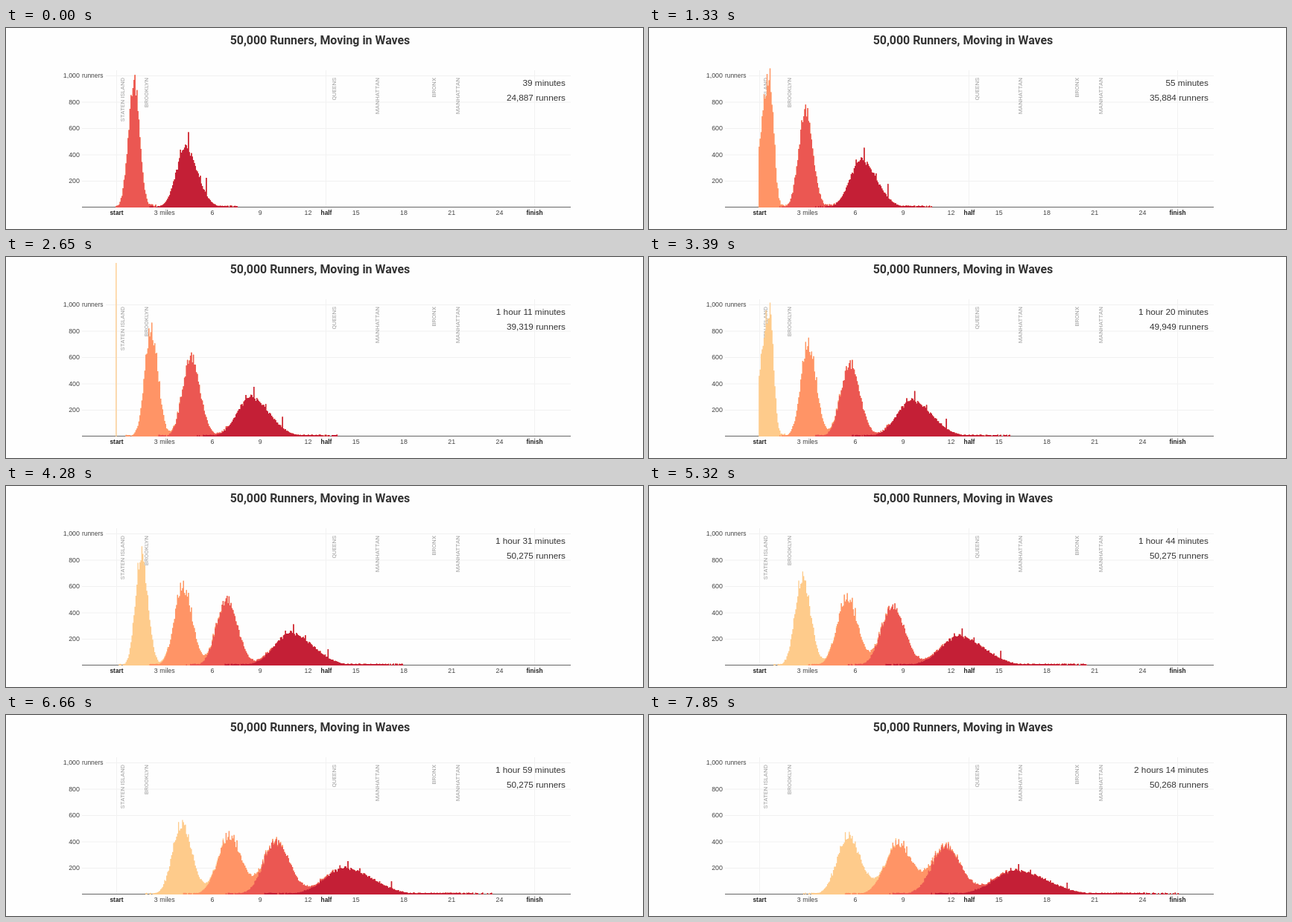
Recreate the animation shown at these times as an HTML page. Size 855x271 px, loop 7.99 s.

```html
<!DOCTYPE html>
<html lang="en">
<head>
<meta charset="utf-8">
<title>50,000 Runners, Moving in Waves</title>
<style>
  html, body { margin: 0; width: 100%; height: 100%; overflow: hidden; background: #fefefe; }
  svg { display: block; width: 855px; height: 271px; font-family: "Liberation Sans", Arial, sans-serif; }
</style>
</head>
<body>
<svg id="chart" viewBox="0 0 855 271"></svg>
<script>
const LOOP = 7990, STEP = 148, LAST = 53;
const START = 148.5, MILE = 561 / 26.2, BASE = 242, UNIT = 0.1775, TOP = 8;
const LEFT = 147.2, BIN = 561 / 421.95, BINS = 424;   // 100 m per bin

// [step, value] pairs
const minuteKeys = [[0, 39], [9, 55], [18, 71], [23, 80], [36, 104], [45, 119], [53, 134]];
const runnerKeys = [[0, 24887], [3, 24960], [4, 26100], [9, 35884], [11, 37610], [17, 37742],
  [18, 39319], [23, 49949], [25, 50268], [27, 50275], [46, 50275], [53, 50268]];

// Peak place: x + v*d + a*d*d, d = minutes since `at`; peak height: k / (place - c)
const waves = [
  { color: '#c41f36', begin: 3, at: 39, x: 241, v: 2.8, a: -0.0015, k: 77000, c: 70, left: 0.84, right: 1.1, crest: 1.27 },
  { color: '#eb5752', begin: 24, at: 39, x: 172, v: 2.38, a: 0, k: 125400, c: 40, left: 1, right: 1.08, crest: 1.06 },
  { color: '#ff9466', begin: 46, at: 55, x: 162, v: 2, a: 0.0023, k: 97200, c: 71, left: 1, right: 1.12, crest: 1.1 },
  { color: '#fecb8b', begin: 71, at: 80, x: 162, v: 1.74, a: 0.004, k: 77500, c: 91, left: 1, right: 1.12, crest: 1.06 }
];

const svg = document.getElementById('chart');

function add(tag, attrs, text) {
  const el = document.createElementNS('http://www.w3.org/2000/svg', tag);
  for (const name in attrs) el.setAttribute(name, attrs[name]);
  if (text) el.textContent = text;
  svg.appendChild(el);
  return el;
}

function label(x, y, text, size, anchor, fill, more) {
  return add('text', { x, y, 'font-size': size, 'text-anchor': anchor, fill, ...more }, text);
}

function line(x1, y1, x2, y2, stroke) {
  add('line', { x1, y1, x2, y2, stroke });
}

function hash(n, seed) {
  const s = Math.sin(n * 12.9898 + seed * 78.233) * 43758.5453;
  return s - Math.floor(s);
}

function lookup(keys, k) {
  let i = 0;
  while (i < keys.length - 2 && k >= keys[i + 1][0]) i++;
  const [a, va] = keys[i], [b, vb] = keys[i + 1];
  return va + (vb - va) * (k - a) / (b - a);
}

// Returns a function giving the number of runners of one wave in bin i
function profile(w, seed, min) {
  const age = min - w.begin;
  if (age < 0) return () => 0;
  if (age < 1.2) return i => i === 0 ? 1400 : 0;
  const d = min - w.at;
  const mu = w.x + w.v * d + w.a * d * d;
  const ideal = w.k / (mu - w.c);
  const peak = Math.min(ideal, 960);
  const sigma = 6578 / ideal;
  const young = Math.exp(-Math.max(0, age - 9) / 2.5);
  const sl = sigma * w.left * (1 + 0.9 * young);
  const sr = sigma * w.right * (1 - 0.2 * young);
  const mid = Math.round((mu - LEFT) / BIN);
  const crest = seed ? mid : mid + 2;
  const clump = seed ? -1 : Math.round((mu + 0.158 * (mu - w.c) - LEFT) / BIN);
  const front = seed ? mu + 4.2 * sr : 312 + 4.25 * (min - 39);
  const back = mu - 4 * sl;

  return i => {
    const x = LEFT + (i + 0.5) * BIN;
    if (x < back || x > front) return 0;
    const z = (x - mu) / (x < mu ? sl : sr);
    const r = hash(i - mid, seed + 1), r2 = hash(i - mid, seed + 9);
    let h = peak * Math.exp(-z * z / 2);
    h *= 0.93 + 0.12 * r + (r2 > 0.9 ? 0.08 : 0);
    h += (r2 - 0.5) * Math.sqrt(h);
    if (i === crest) h = peak * w.crest;
    if (i === clump) h = Math.max(h, peak * 0.5);
    if (h < 12) {
      const span = x < mu ? (mu - x) / (mu - back) : (x - mu) / (front - mu);
      h = r > (span - 0.7) * 1.6 ? 9 + 5 * r2 : 0;
    }
    return h;
  };
}

// Grid
[200, 400, 600, 800, 1000].forEach(n => {
  const y = BASE - n * UNIT;
  line(n === 1000 ? 134 : 102, y, 758, y, '#f1f1f1');
  label(99, y + 2.8, n.toLocaleString('en-US'), 8.9, 'end', '#444');
});
label(102, 66.9, 'runners', 8.4, 'start', '#444');
[148.5, 429.5, 709.5].forEach(x => line(x, 57, x, BASE, '#f2f2f2'));

const roboto = { 'font-family': 'Roboto, sans-serif' };
[[157, 'STATEN ISLAND'], [188.3, 'BROOKLYN'], [440.3, 'QUEENS'], [499, 'MANHATTAN'],
  [574.7, 'BRONX'], [606.7, 'MANHATTAN']].forEach(([x, name]) =>
  label(0, 0, name, 8.1, 'end', '#a0a0a0', { ...roboto, transform: `translate(${x + 2.4} 67) rotate(-90)` }));

label(421.5, 22, '50,000 Runners, Moving in Waves', 15.9, 'middle', '#333', { ...roboto, 'font-weight': 700 });
const clock = label(751, 77.6, '', 11.75, 'end', '#333');
const count = label(751, 97.6, '', 11.75, 'end', '#333');

line(102, 241.5, 758, 241.5, '#666');

// Lightest layer first: each one holds the sum of all waves below it
const layers = [];
for (let i = waves.length - 1; i >= 0; i--) layers[i] = add('path', { fill: waves[i].color });

for (let n = 3; n <= 24; n += 3)
  label(START + n * MILE, 252.2, n === 3 ? '3 miles' : n, 8.8, 'middle', '#444');
[[148.5, 'start'], [430, 'half'], [709.5, 'finish']].forEach(([x, s]) =>
  label(x, 252.2, s, 8.3, 'middle', '#222', { 'font-weight': 700 }));

function plural(n, word) {
  return n + ' ' + word + (n === 1 ? '' : 's');
}

function draw(k) {
  const min = lookup(minuteKeys, k);
  const m = Math.round(min), hours = Math.floor(m / 60);
  clock.textContent = (hours ? plural(hours, 'hour') + ' ' : '') + plural(m % 60, 'minute');
  count.textContent = Math.round(lookup(runnerKeys, k)).toLocaleString('en-US') + ' runners';

  const sum = new Array(BINS).fill(0);
  waves.forEach((w, n) => {
    const at = profile(w, n, min);
    let d = `M${LEFT} ${BASE}`;
    for (let i = 0; i < BINS; i++) {
      sum[i] += at(i);
      const y = Math.max(TOP, BASE - sum[i] * UNIT);
      d += `V${y.toFixed(1)}H${(LEFT + (i + 1) * BIN).toFixed(2)}`;
    }
    layers[n].setAttribute('d', d + `V${BASE}Z`);
  });
}

let shown = -1;
function tick(now) {
  const k = Math.min(LAST, Math.floor((now % LOOP + 16) / STEP));
  if (k !== shown) draw(shown = k);
  requestAnimationFrame(tick);
}
tick(performance.now());
</script>
</body>
</html>
```
